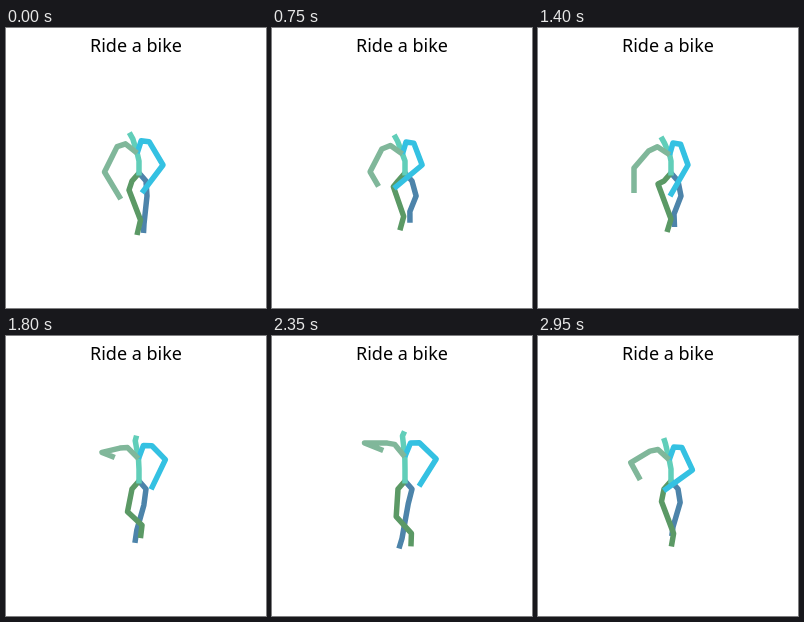
Recreate the animation shown at these times as an HTML page. Size 260x280 px, loop 3 s.

```html
<!DOCTYPE html>
<html lang="en">
<head>
<meta charset="utf-8">
<title>Ride a bike</title>
<style>
  html, body { margin: 0; width: 100%; height: 100%; overflow: hidden; background: #fff; }
  svg { display: block; width: 260px; height: 280px; }
  path { fill: none; stroke-width: 5.5; stroke-linejoin: round; }
  text { font: 18px "Noto Sans", "DejaVu Sans", sans-serif; text-anchor: middle; }
</style>
</head>
<body>
<svg viewBox="0 0 260 280">
  <text x="130" y="24">Ride a bike</text>
  <path id="rightLeg" stroke="#4D84AA"/>
  <path id="leftLeg" stroke="#5B9965"/>
  <path id="spine" stroke="#61CEB9"/>
  <path id="rightArm" stroke="#34C1E2"/>
  <path id="leftArm" stroke="#80B79A"/>
</svg>
<script>
const LOOP = 3000, STEP = 50;

const ease = (t, from, to) => {
  const u = Math.min(1, Math.max(0, (t - from) / (to - from)));
  return u * u * (3 - 2 * u);
};

// Four movements, each from 0 to 1, drive every joint.
const movements = t => ({
  settle: 1 - ease(t, 0, 1400),
  rise: ease(t, 1400, 2100) - 0.56 * ease(t, 2100, 2950),
  drop: ease(t, 2100, 2600) - 0.4 * ease(t, 2600, 2950),
  dip: ease(t, 0, 750) - ease(t, 750, 1400) + ease(t, 2600, 2950)
});

const add = (a, b) => [a[0] + b[0], a[1] + b[1]];

// Moves a resting value by the given shift for each movement.
function blend(rest, shifts, m) {
  return Object.entries(shifts).reduce(
    (sum, [name, [a, b]]) => add(sum, [a * m[name], b * m[name]]), rest);
}

function polar([degrees, length]) {
  const angle = degrees * Math.PI / 180;
  return [length * Math.cos(angle), length * Math.sin(angle)];
}

function drawChain(id, ...points) {
  const path = points.map(p => p.map(n => n.toFixed(2)).join(" ")).join("L");
  document.getElementById(id).setAttribute("d", "M" + path);
}

function draw(t) {
  const m = movements(t);
  const pelvis = [133, 145];

  // Leaning forward lowers the upper body and draws it inward.
  const lean = 9 - 2.2 * m.settle - 9 * m.rise;
  const sway = -0.8 * m.settle - m.dip;
  const upper = (x, dx, y, dy) => [x + dx * lean + sway, y + dy * lean];
  const chest = upper(133, -0.15, 120, 0.75);
  const neck = upper(131, -0.5, 98, 1.9);
  const head = add(neck, blend([-3.5, -6.3], { rise: [8, 2], drop: [-3, 0] }, m));

  const rightElbow = blend([150, 137],
    { settle: [7, 0], rise: [15.5, -22], drop: [1, 11], dip: [-3, 0] }, m);
  const rightForearm = blend([120, 36],
    { settle: [7, -1], rise: [-7, -5], drop: [17, 1], dip: [17, 1] }, m);

  const leftElbow = blend([96, 140],
    { settle: [2.5, 4], rise: [0, -39], drop: [-7, 3], dip: [1, 2] }, m);
  const leftForearm = blend([90, 25],
    { settle: [-31, 6.6], rise: [-112, -18.5], drop: [61, 23], dip: [-16, -11] }, m);

  const rightKnee = blend([143, 168],
    { settle: [-2, 0], rise: [-8.5, 2], drop: [1.5, -4], dip: [2, 0] }, m);
  const rightFoot = blend([136.5, 199],
    { settle: [1, 6], rise: [-12.5, 13], drop: [3, 4], dip: [1, -7] }, m);
  const rightAnkle = add(rightFoot,
    blend([-0.5, -13], { settle: [1, 4], rise: [4, 0], drop: [0, 6] }, m));

  const leftKnee = blend([120, 156],
    { settle: [3, 6], rise: [2.5, 32.5], drop: [4, -8] }, m);
  const leftAnkle = blend([133, 191],
    { settle: [1.5, 1], rise: [5, -3], drop: [4, 18], dip: [-2, -3] }, m);
  const leftFoot = add(leftAnkle, blend([-4, 13], { settle: [0.5, 2], rise: [4, 0] }, m));

  drawChain("rightLeg", pelvis, [140, 153], rightKnee, rightAnkle, rightFoot);
  drawChain("leftLeg", pelvis, [126, 153], leftKnee, leftAnkle, leftFoot);
  drawChain("spine", [133, 147.5], [133, 133], chest, neck, head);
  drawChain("rightArm", chest, upper(139, -0.45, 106, 1), upper(148, -0.6, 105.5, 1.2),
    rightElbow, add(rightElbow, polar(rightForearm)));
  drawChain("leftArm", chest, upper(123, -0.4, 107, 1.3), upper(116, -0.6, 105, 2),
    leftElbow, add(leftElbow, polar(leftForearm)));
}

const start = performance.now();
function tick() {
  const elapsed = (performance.now() - start) % LOOP;
  draw(Math.floor(elapsed / STEP) * STEP);
  requestAnimationFrame(tick);
}
tick();
</script>
</body>
</html>
```
